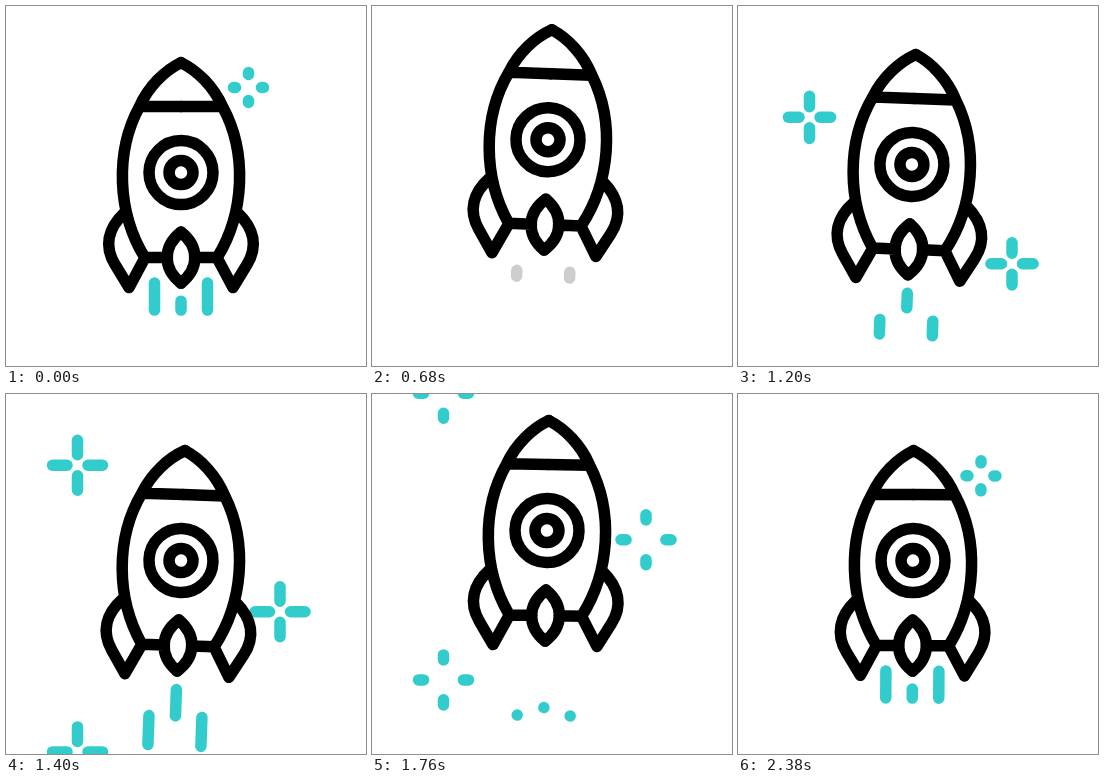
Write an HTML page with a canvas that moves like this. It is 360 px wide and 360 px high and loops after 2.4 s.

```html
<!DOCTYPE html>
<html lang="en">
<head>
<meta charset="utf-8">
<title>Rocket</title>
<style>
  html, body { margin: 0; width: 100%; height: 100%; overflow: hidden; background: #fff; }
  canvas { display: block; }
</style>
</head>
<body>
<canvas id="stage" width="360" height="360"></canvas>
<script>
const ctx = document.getElementById('stage').getContext('2d');
const LOOP = 2400, TEAL = '#33cccc', GRAY = '#cdcdcd';
const CENTER_X = 175, CENTER_Y = 166.6;

// Right half of the rocket, around the middle of its window.
const half = new Path2D(`
  M0 -110 C16.5 -102 32.5 -86 41.5 -66 C66.5 -20 63.5 40 36.5 84.5
  M0 -66 H40.5
  M56.5 40 C73.5 56 77 74 66 92 L52 115 L36 85 H13.5
  M0 59.5 C18.5 74 18.5 96 0 110.5`);

const clamp = p => Math.min(1, Math.max(0, p));
const mix = (t, start, end, from, to) => from + (to - from) * clamp((t - start) / (end - start));
const hop = (t, start, length, height) =>
  height * Math.sin(Math.PI * clamp((t - start) / length)) ** 2;

const lift = t => hop(t, 230, 1150, 37) + hop(t, 1390, 920, 33);

function sway(t) {
  const a = Math.PI * Math.min(t, 1360) / 680;
  return Math.sin(a / 2) - 3.2 * Math.sin(a) ** 2;
}

// Leans over once, then settles back with a fixed half-life.
const tilt = t => mix(t, 320, 560, 0, 2.05) * 2 ** (-Math.max(0, t - 1400) / 360);

function line(x1, y1, x2, y2, color = TEAL) {
  ctx.strokeStyle = color;
  ctx.beginPath();
  ctx.moveTo(x1, y1);
  ctx.lineTo(x2 + 0.01, y2);
  ctx.stroke();
}

function sparkle(x, y, inner, outer) {
  for (const [dx, dy] of [[1, 0], [-1, 0], [0, 1], [0, -1]])
    line(x + dx * inner, y + dy * inner, x + dx * outer, y + dy * outer);
}

function passingStars(t) {
  if (t < 880 || t > 1915) return;
  const outer = mix(t, 880, 1320, 10.5, 25);
  const inner = mix(t, 1475, 1915, 10.5, 25);
  for (let i = 0; i < 3; i++)
    sparkle(i % 2 ? 274 : 71.5, 71.5 + i * 146.5 - i * (i - 1) * 3.2 - (t - 1400) * 0.2, inner, outer);
}

function attachedStar(t) {
  if (t > 400 && t < 2050) return;
  const late = t > 2000;
  const outer = late ? mix(t, 2050, 2300, 5, 15) : 15;
  const inner = late ? mix(t, 2150, 2380, 5, 13) : mix(t, 0, 320, 13, 14.6);
  sparkle(67.5, -85.1, inner, outer);
}

function sideTrails(top, bottom, color) {
  for (const x of [-26.5, 26.5]) line(x, top, x, bottom, color);
}

function middleTrail(top, bottom) {
  line(0, top, 0, bottom);
}

function trails(t) {
  if (t < 740)
    sideTrails(mix(t, 320, 720, 110.5, 134), 137.5, t < 600 ? TEAL : GRAY);
  if (t < 360)
    middleTrail(mix(t, 0, 320, 128.5, 137.2), 137.5);
  if (t > 960 && t < 1820) {
    sideTrails(mix(t, 1400, 1760, 156, 185), mix(t, 1000, 1400, 156, 185));
    middleTrail(mix(t, 1400, 1760, 129, 177), mix(t, 960, 1760, 129, 177));
  }
  if (t > 2000) {
    const bottom = mix(t, 2000, 2250, 110.5, 137.5);
    sideTrails(110.5, bottom);
    middleTrail(Math.min(bottom, mix(t, 2100, 2380, 110.5, 128.5)), bottom);
  }
}

function rocket() {
  ctx.strokeStyle = '#000';
  for (const side of [1, -1]) {
    ctx.save();
    ctx.scale(side, 1);
    ctx.stroke(half);
    ctx.restore();
  }
  for (const radius of [32, 12]) {
    ctx.beginPath();
    ctx.arc(0, 0, radius, 0, Math.PI * 2);
    ctx.stroke();
  }
}

function draw(now) {
  const t = now % LOOP;
  ctx.fillStyle = '#fff';
  ctx.fillRect(0, 0, 360, 360);
  ctx.lineCap = ctx.lineJoin = 'round';
  ctx.lineWidth = 11.5;
  passingStars(t);

  ctx.save();
  ctx.translate(CENTER_X + sway(t), CENTER_Y - lift(t));
  ctx.rotate(tilt(t) * Math.PI / 180);
  attachedStar(t);
  trails(t);
  rocket();
  ctx.restore();
  requestAnimationFrame(draw);
}
requestAnimationFrame(draw);
</script>
</body>
</html>
```
